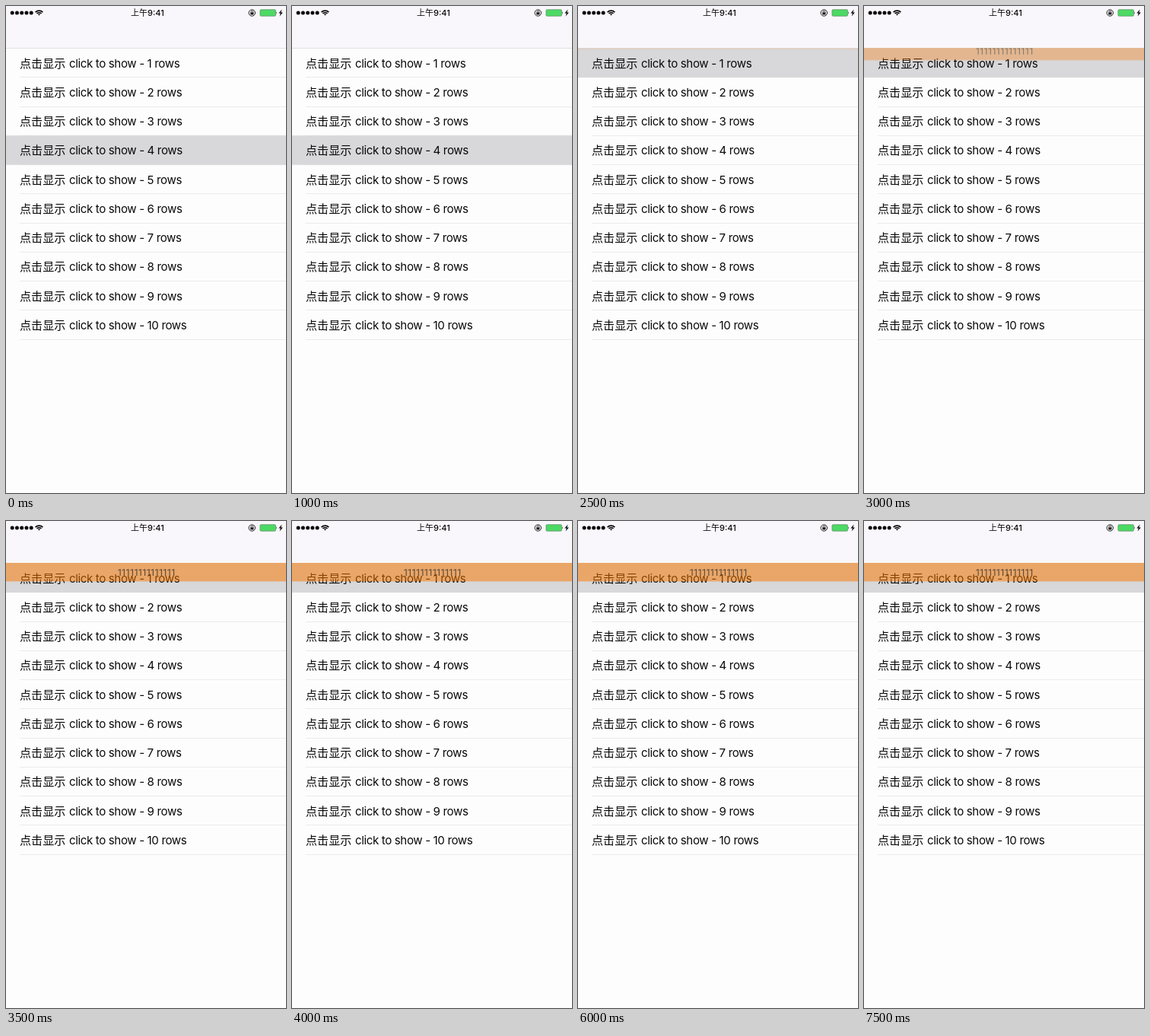
Write an HTML page that moves like this. It is 368x640 px and loops after 8 s.

```html
<!DOCTYPE html>
<html lang="zh-CN">
<head>
<meta charset="utf-8">
<title>Drop-down banner list</title>
<style>
  html, body { margin: 0; width: 100%; height: 100%; overflow: hidden; background: #fdfdfd; }
  svg { display: block; width: 368px; height: 640px; }
  text { font-family: Inter, "Noto Sans CJK SC", "Noto Sans CJK", sans-serif; fill: #0a0a0a; }
  .cjk { font: 15.1px "Noto Sans CJK SC", "Noto Sans CJK", sans-serif; }
  .label { font-size: 15.1px; letter-spacing: -.37px; }
  .clock { font-size: 11px; font-weight: 500; }
  .note { font: 12.4px Roboto, sans-serif; letter-spacing: -1.54px; fill: #222; opacity: .72; }
  .line { stroke: #ebebed; stroke-width: 1; }

  /* The screen refreshes twice a second, so every change is a hard step. */
  #selected { animation: select 8s step-end infinite; }
  #banner { animation: drop 8s step-end infinite; }
  @keyframes select {
    0% { transform: translateY(114.75px); }
    31.25%, 100% { transform: translateY(0); }
  }
  @keyframes drop {
    0% { transform: translateY(-24px); opacity: 0; }
    31.25% { transform: translateY(-22px); opacity: .18; }
    37.5% { transform: translateY(-8.3px); opacity: .66; }
    43.75%, 100% { transform: translateY(0); opacity: 1; }
  }
</style>
</head>
<body>
<svg viewBox="0 0 368 640">
  <defs>
    <clipPath id="below"><rect y="55" width="368" height="585"/></clipPath>
  </defs>
  <rect width="368" height="640" fill="#fdfdfd"/>
  <g id="lines"></g>
  <rect id="selected" y="55.4" width="368" height="38.7" fill="#d8d7d9"/>
  <g id="rows"></g>

  <rect width="368" height="55" fill="#f9f7fb"/>
  <path d="M0 55.5H368" stroke="#e0dee2"/>

  <g clip-path="url(#below)">
    <g id="banner">
      <rect y="55" width="368" height="24.4" fill="#fa7a00" fill-opacity=".52"/>
      <text class="note" x="146.2" y="72.3">11111111111111</text>
    </g>
  </g>

  <g id="signal" fill="#0a0a0a"></g>
  <g fill="none" stroke="#0a0a0a" stroke-width="1.7">
    <path d="M38.6 8.1a7 7 0 0 1 9.8 0M40.5 10a4.3 4.3 0 0 1 6 0"/>
    <path d="M43.5 12.6l-1.5-1.6a2.2 2.2 0 0 1 3 0z" fill="#0a0a0a" stroke="none"/>
  </g>
  <text class="clock" x="186" y="13" text-anchor="middle">上午9:41</text>

  <g fill="none" stroke="#0a0a0a">
    <circle cx="323.3" cy="9" r="4.2" stroke-width=".9"/>
    <path d="M322 8.6V7.7a1.4 1.4 0 0 1 2.8 0V8.6" stroke-width=".8"/>
    <rect x="321.3" y="8.4" width="4.1" height="3" fill="#0a0a0a" stroke="none"/>
  </g>
  <rect x="333.9" y="4.7" width="20.6" height="8.6" rx="1.4" fill="#4cd964" stroke="#5f7a64" stroke-width=".6"/>
  <path d="M355.4 7.4q1.4 1.6 0 3.2z" fill="#0a0a0a"/>
  <path d="M362.6 4.6l-4.2 5h2.4l-1.2 4 4.3-5.2h-2.5z" fill="#0a0a0a"/>
</svg>
<script>
  const NS = "http://www.w3.org/2000/svg";
  const ROW = 38.25, TOP = 55.5;

  function add(id, tag, attrs, text = "") {
    const el = document.createElementNS(NS, tag);
    for (const key in attrs) el.setAttribute(key, attrs[key]);
    el.textContent = text;
    document.getElementById(id).append(el);
  }

  for (let i = 0; i < 10; i++) {
    const y = TOP + ROW * i;
    const edge = Math.floor(y + ROW) + .5;
    add("lines", "path", { class: "line", d: `M18 ${edge}H368` });
    add("rows", "text", { class: "cjk", x: 18, y: y + 25 }, "点击显示");
    add("rows", "text", { class: "label", x: 82.9, y: y + 25.1 }, `click to show - ${i + 1} rows`);
  }
  for (let i = 0; i < 5; i++) {
    add("signal", "circle", { cx: 8.2 + 6.25 * i, cy: 9, r: 2.5 });
  }
</script>
</body>
</html>
```
